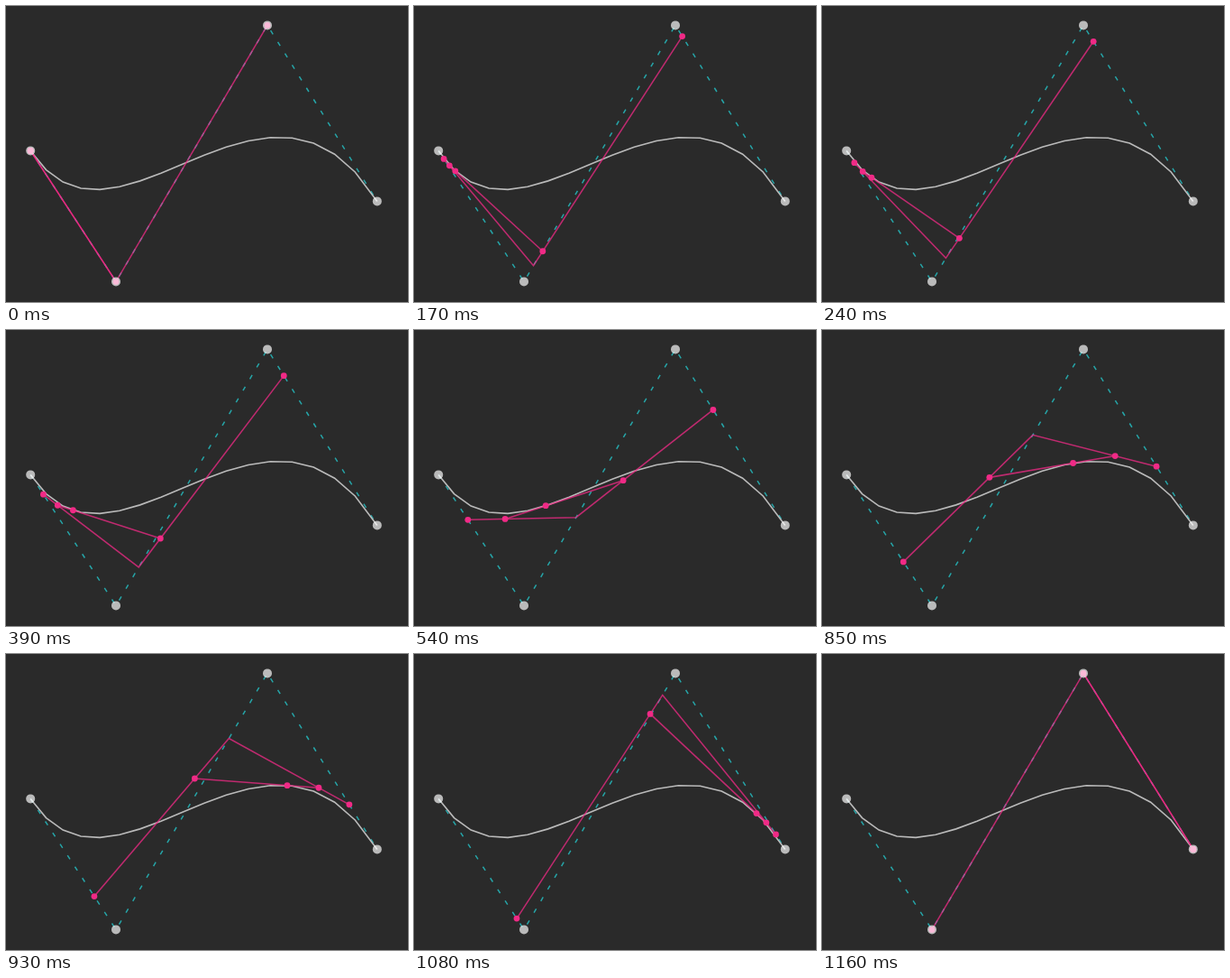
Recreate the animation shown at these times as an HTML page with a canvas. Size 446 px wide and 328 px high, loop 1240 ms.

```html
<!DOCTYPE html>
<html lang="en">
<head>
<meta charset="utf-8">
<title>Cubic Bézier construction</title>
<style>
  html, body { margin: 0; height: 100%; overflow: hidden; background: #2a2a2a; }
  canvas { display: block; }
</style>
</head>
<body>
<canvas id="stage" width="446" height="328"></canvas>
<script>
const ctx = document.getElementById('stage').getContext('2d');
const STEPS = 16;
const STEP_MS = 1240 / STEPS;
const PINK = '#f02a86';
const PINK_LINE = 'rgba(240, 42, 134, .75)';
const points = [[27.2, 160.4], [122, 305.4], [290, 21.4], [411.8, 216.4]];

// Pace of the parameter: slow start, then nearly even [step, t]
const pace = [[0, 0], [2, .0625], [5, .15], [7, .344], [12, .746], [15, 1]];

const mix = (a, b, t) => a.map((v, i) => v + (b[i] - v) * t);

// One level of de Casteljau's algorithm
const reduce = (pts, t) => pts.slice(1).map((p, i) => mix(pts[i], p, t));

const curveAt = t => reduce(reduce(reduce(points, t), t), t)[0];
const curve = Array.from({ length: 18 }, (_, i) => curveAt(i < 17 ? i * .0584 : 1));

function paramAt(step) {
  const i = Math.max(1, pace.findIndex(k => k[0] >= step));
  const [a, b] = [pace[i - 1], pace[i]];
  return mix(a, b, (step - a[0]) / (b[0] - a[0]))[1];
}

function line(pts, color, width, dash = []) {
  ctx.strokeStyle = color;
  ctx.lineWidth = width;
  ctx.setLineDash(dash);
  ctx.beginPath();
  pts.forEach(p => ctx.lineTo(...p));
  ctx.stroke();
}

function dot([x, y], r, color) {
  ctx.fillStyle = color;
  ctx.beginPath();
  ctx.arc(x, y, r, 0, Math.PI * 2);
  ctx.fill();
}

function draw(t) {
  const q = reduce(points, t);
  const r = reduce(q, t);
  const [tip] = reduce(r, t);

  ctx.fillStyle = '#2a2a2a';
  ctx.fillRect(0, 0, 446, 328);
  line(points, '#25a5a8', 1.5, [5, 10]);
  line(curve, '#bababa', 1.6);
  line(q, PINK_LINE, 1.55);
  line(r, PINK_LINE, 1.55);
  [q[0], q[2], ...r, tip].forEach(p => dot(p, 3.4, PINK));
  points.forEach(p => dot(p, 5, 'rgba(255, 255, 255, .68)'));
}

function tick(now) {
  const step = Math.floor((now + 5) / STEP_MS) % STEPS;
  draw(paramAt(step));
  requestAnimationFrame(tick);
}

draw(0);
requestAnimationFrame(tick);
</script>
</body>
</html>
```
